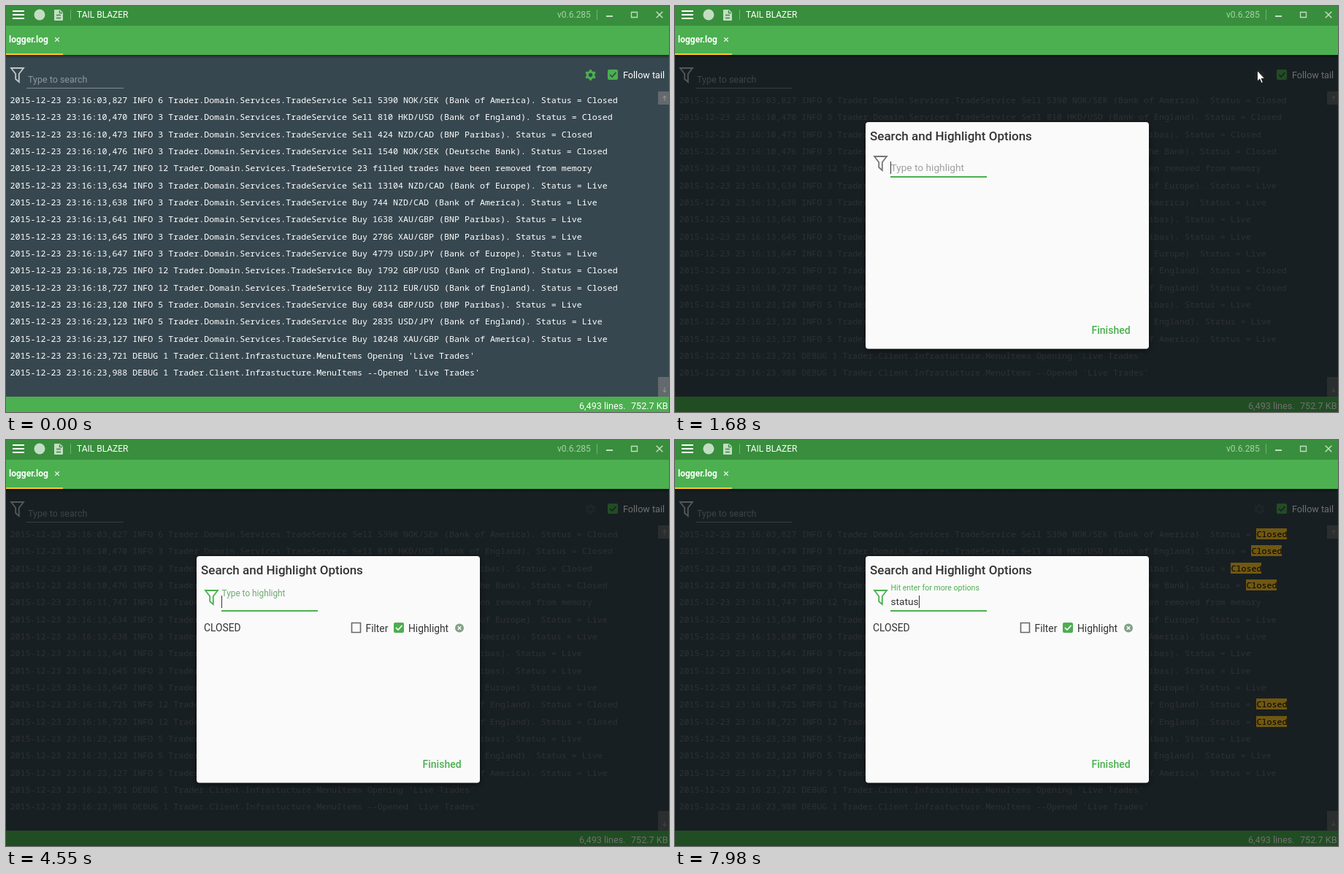
These frames come from a looping animation (908 by 556 pixels, 8000 ms). An HTML page with a canvas:

```html
<!DOCTYPE html>
<html lang="en">
<head>
<meta charset="utf-8">
<title>Tail Blazer</title>
<style>
  html, body { margin: 0; width: 100%; height: 100%; overflow: hidden; background: #37474f; }
  canvas { display: block; }
</style>
</head>
<body>
<canvas id="stage" width="908" height="556"></canvas>
<script>
const ctx = document.getElementById('stage').getContext('2d');
const LOOP = 8000, STEP = 70;
const GREEN = '#4caf50', AMBER = '#ffca28', BODY = '#37474f';
const UI = 'Roboto, sans-serif', MONO = '"Noto Sans Mono", monospace';
const CHAR = 7, ROW = 23.34, LOG_X = 5.5;

const trades = [
  ['03,827', 6, 'Sell 5390 NOK/SEK (Bank of America). Status = Closed'],
  ['10,470', 3, 'Sell 810 HKD/USD (Bank of England). Status = Closed'],
  ['10,473', 3, 'Sell 424 NZD/CAD (BNP Paribas). Status = Closed'],
  ['10,476', 3, 'Sell 1540 NOK/SEK (Deutsche Bank). Status = Closed'],
  ['11,747', 12, '23 filled trades have been removed from memory'],
  ['13,634', 3, 'Sell 13104 NZD/CAD (Bank of Europe). Status = Live'],
  ['13,638', 3, 'Buy 744 NZD/CAD (Bank of America). Status = Live'],
  ['13,641', 3, 'Buy 1638 XAU/GBP (BNP Paribas). Status = Live'],
  ['13,645', 3, 'Buy 2786 XAU/GBP (BNP Paribas). Status = Live'],
  ['13,647', 3, 'Buy 4779 USD/JPY (Bank of Europe). Status = Live'],
  ['18,725', 12, 'Buy 1792 GBP/USD (Bank of England). Status = Closed'],
  ['18,727', 12, 'Buy 2112 EUR/USD (Bank of England). Status = Closed'],
  ['23,120', 5, 'Buy 6034 GBP/USD (BNP Paribas). Status = Live'],
  ['23,123', 5, 'Buy 2835 USD/JPY (Bank of England). Status = Live'],
  ['23,127', 5, 'Buy 10248 XAU/GBP (Bank of America). Status = Live']
].map(([sec, thread, rest]) => `${sec} INFO ${thread} Trader.Domain.Services.TradeService ${rest}`);
const menu = 'DEBUG 1 Trader.Client.Infrastucture.MenuItems';
const logLines = [...trades, `23,721 ${menu} Opening 'Live Trades'`, `23,988 ${menu} --Opened 'Live Trades'`]
  .map(line => '2015-12-23 23:16:' + line);

// Timeline, in ms
const DISABLED = 1400, ROW_ADDED = 4550, HIGHLIGHTED = 4620;
const typing = [[0, ''], [3290, 'c'], [3570, 'cl'], [3710, 'clo'], [3850, 'clos'], [4060, 'close'],
  [4270, 'closed'], [4480, ''], [6370, 's'], [6510, 'st'], [6720, 'sta'], [6930, 'stat'],
  [7840, 'statu'], [7980, 'status']];
const caretOff = [[2030, 2520], [2870, 3290], [4970, 5460], [5950, 6370], [7420, 7840]];
const pointerShown = [[420, 3290], [5180, 6370]];
const pointerPath = [[420, 578, 7], [910, 801, 91], [980, 801, 91], [1050, 796, 94], [1120, 797, 89],
  [1680, 797, 88], [2170, 378, 314], [2660, 380, 226], [3290, 380, 226], [5180, 363, 249], [5600, 357, 218]];

const clamp = v => Math.max(0, Math.min(1, v));
const ease = v => (1 - Math.cos(Math.PI * clamp(v))) / 2;
const mix = (a, b, k) => a + (b - a) * k;
const within = (t, ranges) => ranges.some(([from, to]) => t >= from && t < to);

function rect(x, y, w, h, color) {
  ctx.fillStyle = color;
  ctx.fillRect(x, y, w, h);
}

function roundRect(x, y, w, h, r, color) {
  ctx.fillStyle = color;
  ctx.beginPath();
  ctx.roundRect(x, y, w, h, r);
  ctx.fill();
}

function disc(x, y, r, color) {
  ctx.fillStyle = color;
  ctx.beginPath();
  ctx.arc(x, y, r, 0, 7);
  ctx.fill();
}

function stroke(path, color, width = 1, x = 0, y = 0) {
  ctx.save();
  ctx.translate(x, y);
  ctx.strokeStyle = color;
  ctx.lineWidth = width;
  ctx.stroke(new Path2D(path));
  ctx.restore();
}

// y is the middle of the capital letters
function text(str, x, y, size, color, weight = 400) {
  ctx.font = `${weight} ${size}px ${UI}`;
  ctx.fillStyle = color;
  ctx.fillText(str, x, y + size * 0.356);
}

const cross = (x, y, r, color, width) =>
  stroke(`M${-r} ${-r}L${r} ${r}M${r} ${-r}L${-r} ${r}`, color, width, x, y);

const funnel = (x, y, color) =>
  stroke('M1 1H18L11.8 9V20L7.2 16V9Z', color, 1.8, x, y);

function checkbox(x, y, tick) {
  roundRect(x, y, 14, 14, 2, GREEN);
  stroke('M3 7L6 10L11.5 4', tick, 1.7, x, y);
}

function gear(x, y, color) {
  ctx.fillStyle = color;
  ctx.beginPath();
  for (let i = 0; i < 24; i++) {
    const a = (i - 0.5) * Math.PI / 12, r = i % 4 < 2 ? 7.6 : 5.7;
    ctx.lineTo(x + r * Math.sin(a), y - r * Math.cos(a));
  }
  ctx.closePath();
  ctx.moveTo(x + 2.7, y);
  ctx.arc(x, y, 2.7, 0, 7);
  ctx.fill('evenodd');
}

function drawHeader() {
  rect(0, 0, 908, 27, '#388e3c');
  rect(0, 27, 908, 40, GREEN);
  for (const y of [6, 11, 16]) rect(9, y, 16, 2, '#fff');
  disc(46, 12, 7.5, '#c3ddc4');
  ctx.fillStyle = '#c3ddc4';
  ctx.fill(new Path2D('M66 6Q66 5 67 5H74L78 9V19Q78 20 77 20H67Q66 20 66 19Z'));
  stroke('M69 12.5H75M69 16.5H75M73.5 6V9.5H77', '#388e3c', 1.3);
  rect(88, 5, 1, 14, '#74b077');
  text('TAIL BLAZER', 97, 12, 12, '#fff');
  text('v0.6.285', 755, 12, 12, '#a9cfab');
  rect(809, 5, 1, 14, '#74b077');
  rect(822, 13, 9, 2, '#c3ddc4');
  stroke('M856.5 8V15.5H864.5V8M856 8.5H865', '#c3ddc4', 1.3);
  cross(895, 12, 4.3, '#c3ddc4', 1.5);
  text('logger.log', 4, 46, 12, '#fff', 700);
  cross(70, 46, 2.8, '#e3f2e4', 1.3);
  rect(0, 65, 78, 2, AMBER);
}

function drawLog(t) {
  ctx.font = `${CHAR / 0.6}px ${MONO}`;
  logLines.forEach((line, i) => {
    const y = Math.round(133 + ROW * i), at = line.indexOf('Closed');
    const marked = t >= HIGHLIGHTED && at > 0;
    ctx.fillStyle = t < DISABLED ? '#fff' : '#686d6f';
    ctx.fillText(marked ? line.slice(0, at) : line, LOG_X, y);
    if (marked) {
      const x = LOG_X + at * CHAR;
      rect(x - 0.5, y - 12, 42, 15, AMBER);
      ctx.fillStyle = '#000';
      ctx.fillText('Closed', x, y);
    }
  });
}

function drawBody(t) {
  rect(0, 67, 908, 468, BODY);
  const shade = ctx.createLinearGradient(0, 67, 0, 72);
  shade.addColorStop(0, 'rgba(0,0,0,.4)');
  shade.addColorStop(1, 'rgba(0,0,0,0)');
  rect(0, 67, 908, 5, shade);

  funnel(6, 84, '#c3c8ca');
  text('Type to search', 30, 100.5, 12.5, '#8d979c');
  rect(28, 112, 133, 1, '#7f8a90');
  gear(800.5, 94.5, t < DISABLED ? GREEN : '#45555d');
  checkbox(824, 87, BODY);
  text('Follow tail', 845, 94.5, 12.6, '#fff');
  drawLog(t);

  rect(893, 117, 15, 18, '#63696c');
  stroke('M902 130V123M899.5 126L902 123.3L904.5 126', '#8f9496', 1.1);
  rect(893, 508, 15, 27, '#63696c');
  stroke('M902 522V529M899.5 526L902 528.7L904.5 526', '#8f9496', 1.1);

  rect(0, 535, 908, 21, GREEN);
  text('6,493 lines.', 785, 547.5, 12.6, '#fff');
  text('752.7 KB', 856, 547.5, 12.6, '#fff');
}

function drawField(t) {
  const typed = typing.filter(([at]) => at <= t).pop()[1];
  const float = ease((t - 3240) / 250) - ease((t - 4440) / 250) + ease((t - 6350) / 250);
  const hint = !typed ? 'Type to highlight'
    : typed.length < 3 ? 'Enter at least 3 characters' : 'Hit enter for more options';
  const hovered = t >= 2520 && !within(t, [[5180, 5320]]);

  funnel(272, 205, hovered ? GREEN : '#757575');
  const hintColor = `rgb(${mix(160, 76, float)},${mix(160, 175, float)},${mix(160, 80, float)})`;
  text(hint, 295.5, mix(221.5, 202.5, float), mix(13.7, 10.6, float), hintColor);
  rect(295, 233, 132, 2, GREEN);
  text(typed, 295.5, 221.5, 13.7, '#333');
  if (!within(t, caretOff)) {
    const x = typed ? Math.round(295.5 + ctx.measureText(typed).width) : 295;
    rect(x, 213, 1, 17, '#333');
  }
}

function drawDialog(t) {
  const open = ease((t - 1370) / 300);
  if (!open) return;
  rect(0, 67, 908, 489, `rgba(0,0,0,${0.56 * open})`);
  ctx.save();
  ctx.translate(455, 314);
  ctx.scale(open, open);
  ctx.translate(-455, -314);
  ctx.globalAlpha = open;
  ctx.shadowColor = 'rgba(0,0,0,.6)';
  ctx.shadowBlur = 8;
  ctx.shadowOffsetY = 2;
  roundRect(261, 159, 388, 310.5, 4, '#fafafa');
  ctx.shadowColor = 'transparent';

  text('Search and Highlight Options', 267, 177.5, 17, '#333', 500);
  drawField(t);
  if (t >= ROW_ADDED) {
    text('CLOSED', 271, 257.5, 13.8, '#333');
    stroke('M473.5 250.5H485.5V263.5H473.5Z', '#666', 1.6);
    text('Filter', 492.5, 258, 13.8, '#333');
    checkbox(531, 250, '#fff');
    text('Highlight', 551, 258, 13.8, '#333');
    disc(621, 257.5, 6, '#83a187');
    cross(621, 257.5, 2.2, '#fff', 1.5);
  }
  text('Finished', 570.5, 444.5, 14, GREEN, 500);
  ctx.restore();
}

function drawPointer(t) {
  if (!within(t, pointerShown)) return;
  const next = pointerPath.findIndex(([at]) => at > t);
  const b = pointerPath[next < 0 ? pointerPath.length - 1 : next];
  const a = next < 0 ? b : pointerPath[next - 1];
  const k = a === b ? 0 : ease((t - a[0]) / (b[0] - a[0]));
  const x = Math.round(mix(a[1], b[1], k)), y = Math.round(mix(a[2], b[2], k));
  const overField = t > 1680 && x > 295 && x < 427 && y > 208 && y < 236;
  if (overField) {
    stroke('M-3 -6.5H0M1 -6.5H4M.5 -6V6M-3 6.5H0M1 6.5H4', '#000', 1, x, y);
    return;
  }
  ctx.save();
  ctx.translate(x, y);
  const arrow = new Path2D('M.5 .5V15L3.8 12L6 17.5L8.2 16.6L6 11.3H10.5Z');
  ctx.fillStyle = '#fff';
  ctx.fill(arrow);
  ctx.restore();
  stroke('M.5 .5V15L3.8 12L6 17.5L8.2 16.6L6 11.3H10.5Z', '#111', 0.8, x, y);
}

function draw(now) {
  const t = Math.floor(now % LOOP / STEP) * STEP;
  drawBody(t);
  drawHeader();
  drawDialog(t);
  drawPointer(t);
  requestAnimationFrame(draw);
}
draw(0);
</script>
</body>
</html>
```
